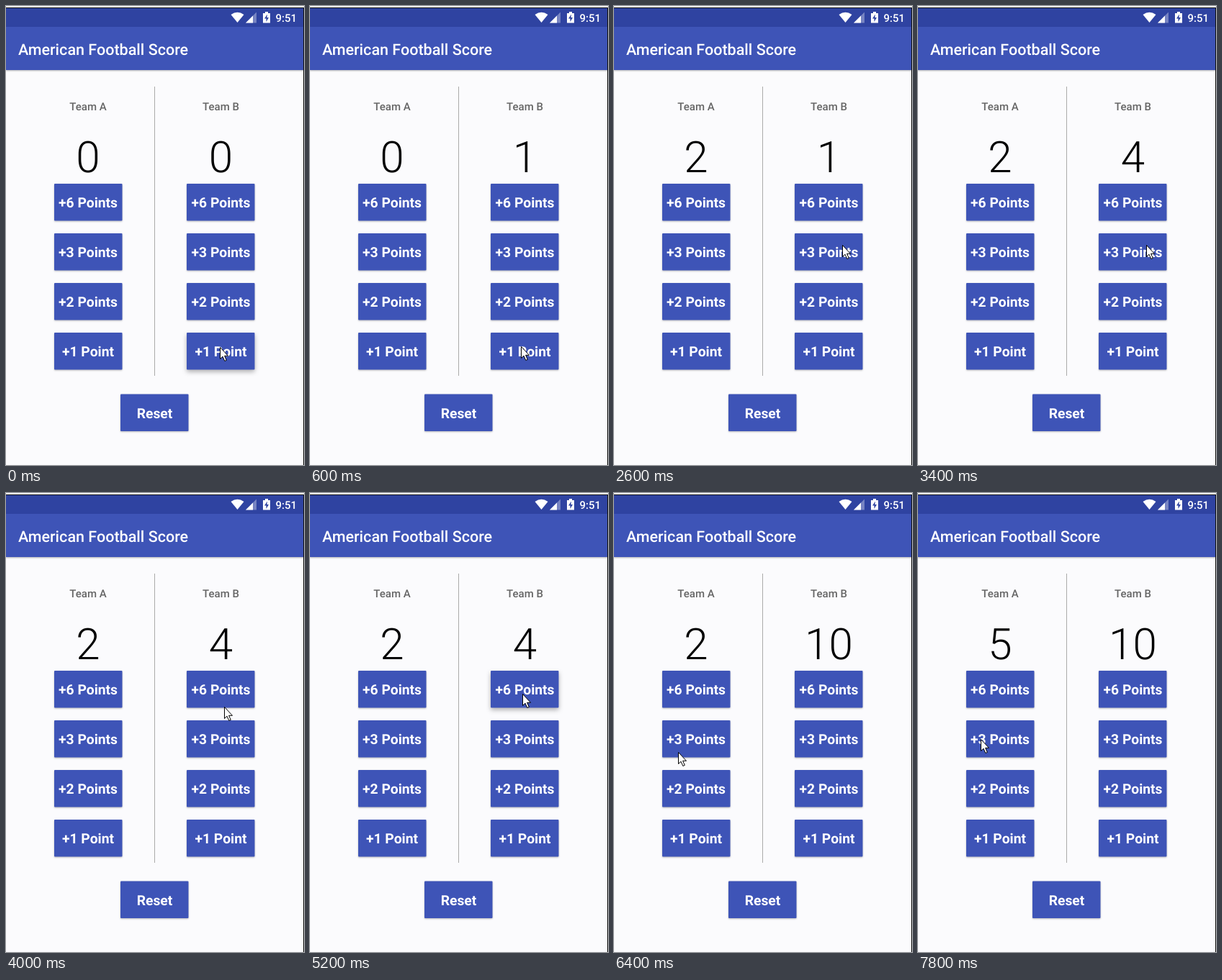
An HTML page that plays this animation: 414x638 px, repeating every 8000 ms.

```html
<!DOCTYPE html>
<html lang="en">
<head>
<meta charset="utf-8">
<title>Score keeper</title>
<style>
  html, body { margin: 0; width: 100%; height: 100%; overflow: hidden; background: #fbfbfd; }
  svg { display: block; }
  text { font-family: Roboto, sans-serif; font-weight: 500; text-rendering: geometricPrecision; }
  .button rect { fill: #3e54b7; filter: drop-shadow(0 1px 1px rgba(0, 0, 0, .27)); }
  .button.pressed rect { filter: drop-shadow(0 3px 3px rgba(0, 0, 0, .3)); }
  .button text { font-size: 19.3px; font-weight: 700; fill: #fff; }
  .label { font-size: 15px; fill: #666; }
  .score { font-size: 60.2px; font-weight: 300; }
  .button text, .label, .score { text-anchor: middle; }
  .bar { fill: #3e54b7; filter: drop-shadow(0 1px 1px rgba(0, 0, 0, .3)); }
</style>
</head>
<body>
<svg width="414" height="638" viewBox="0 0 414 638">
  <rect class="bar" y="28" width="414" height="61"/>
  <rect y="2" width="414" height="27" fill="#2f43a1"/>
  <path d="M0 2.5H413.5V638" fill="none" stroke="#111"/>
  <g fill="#fff">
    <path d="M312.500 12Q321.500 5.500 330.500 12L321.500 23Z"/>
    <path d="M333 23.500L348 8.500V23.500Z" opacity=".35"/>
    <path d="M333 23.500L343 13.500V23.500Z"/>
    <path d="M360 8h4v2h3v13.500h-10V10h3Z"/>
    <path d="M363 11.500L359 17.500h2.500v4.500L365 16h-2.500Z" fill="#2f43a1"/>
    <text x="374.500" y="22" font-size="15">9:51</text>
    <text x="17" y="68" font-size="21.500">American Football Score</text>
  </g>
  <path d="M206.500 112V514" stroke="#aaa"/>
  <g id="board"></g>
  <path id="cursor" d="M.5 .5V16.500L4 13.200L6.800 19.500L9.300 18.400L6.600 12.300H11.500Z" fill="#fff" stroke="#000" stroke-linejoin="round"/>
</svg>
<script>
const LOOP = 8000, STEP = 200;
const TOP = 247, PITCH = 69, MIDDLE = 206.5;
const SPEED = 0.28; // cursor pixels per ms
const POINTS = [6, 3, 2, 1];
const board = document.getElementById('board');
const cursor = document.getElementById('cursor');

function add(parent, tag, attrs, content = '') {
  const node = document.createElementNS('http://www.w3.org/2000/svg', tag);
  for (const name in attrs) node.setAttribute(name, attrs[name]);
  node.textContent = content;
  return parent.appendChild(node);
}

function addButton(x, y, label) {
  const group = add(board, 'g', { class: 'button' });
  add(group, 'rect', { x: Math.round(x - 47.5), y, width: 94.5, height: 51.5, rx: 1 });
  add(group, 'text', { x, y: y + 33 }, label);
  return group;
}

function addTeam(name, x) {
  add(board, 'text', { class: 'label', x, y: 145 }, name);
  return {
    score: add(board, 'text', { class: 'score', x, y: 231 }),
    buttons: POINTS.map((n, row) => addButton(x, TOP + row * PITCH, `+${n} Point${n > 1 ? 's' : ''}`))
  };
}

const teams = [addTeam('Team A', 114), addTeam('Team B', 298.5)];
addButton(MIDDLE, 539.5, 'Reset');

// Where the cursor comes to rest, and when it arrives
const stops = [
  { at: 0, x: 297, y: 474 },
  { at: 1200, x: 124, y: 411 },
  { at: 2600, x: 317, y: 332 },
  { at: 4000, x: 303, y: 297 },
  { at: 5000, x: 295, y: 279 },
  { at: 6400, x: 89, y: 360 },
  { at: 6800, x: 87, y: 342 }
];

// Between stops the cursor rests, then glides at an even pace
function cursorAt(time) {
  const next = stops.findIndex(stop => stop.at > time);
  if (next < 0) return stops[stops.length - 1];
  const from = stops[next - 1], to = stops[next];
  const glide = Math.hypot(to.x - from.x, to.y - from.y) / SPEED;
  const p = Math.max(0, 1 - (to.at - time) / glide);
  const eased = p * p * (3 - 2 * p);
  return { x: from.x + (to.x - from.x) * eased, y: from.y + (to.y - from.y) * eased };
}

// Each press hits the button under the cursor and scores one step later
const clicks = [0, 1800, 2800, 5200, 7000].map(press => {
  const { x, y } = cursorAt(press);
  return { press, team: teams[x > MIDDLE ? 1 : 0], row: Math.floor((y - TOP) / PITCH) };
});

function draw(now) {
  const time = Math.floor(now % LOOP / STEP) * STEP;
  for (const team of teams) team.total = 0;
  for (const { press, team, row } of clicks) {
    const scored = time >= press + STEP;
    if (scored) team.total += POINTS[row];
    team.buttons[row].classList.toggle('pressed', time >= press && !scored);
  }
  for (const team of teams) team.score.textContent = team.total;
  const { x, y } = cursorAt(time);
  cursor.setAttribute('transform', `translate(${Math.round(x)} ${Math.round(y)})`);
}

const start = performance.now();
function tick() {
  draw(performance.now() - start);
  requestAnimationFrame(tick);
}
tick();
</script>
</body>
</html>
```
